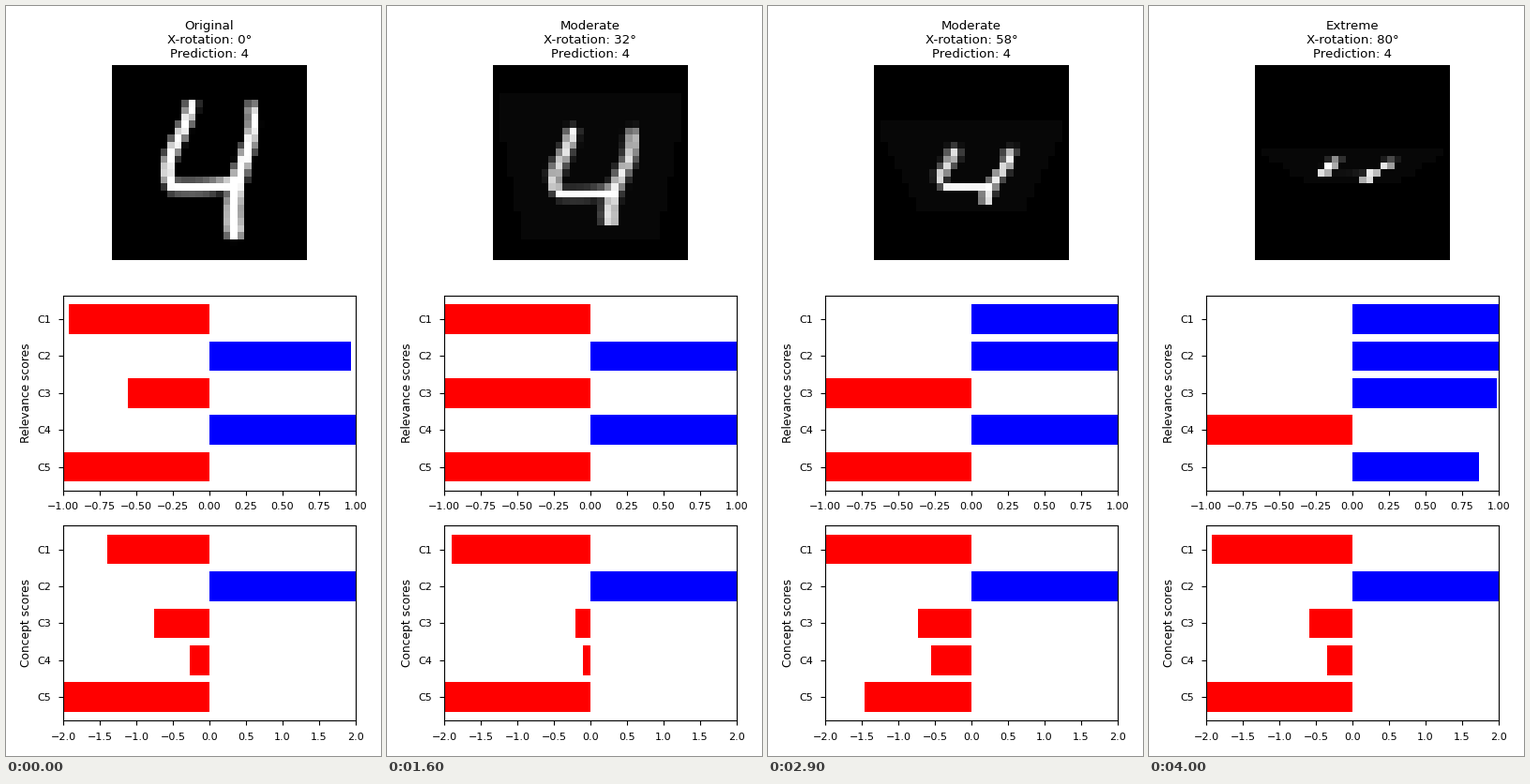
A matplotlib script for the animation above (4.1 s loop, 400 by 800 pixels).

```python
import numpy as np
import matplotlib.pyplot as plt
from matplotlib.animation import FuncAnimation

plt.rcParams.update({
    "font.family": "DejaVu Sans",
    "axes.labelsize": 8.8, "axes.titlesize": 9.6,
    "xtick.labelsize": 8, "ytick.labelsize": 8,
    "xtick.major.pad": 5.6, "ytick.major.pad": 5.6,
})

FRAMES, STEP_MS, STEP_DEG = 41, 100, 2
SIZE = 28
MID = (SIZE - 1) / 2
DEPTH = 27.5
BACKDROP = 7 / 255
ROWS, COLS = np.mgrid[0:SIZE, 0:SIZE].astype(float)


def bezier(p0, p1, p2, p3, n=16):
    t = np.linspace(0, 1, n)[:, None]
    p0, p1, p2, p3 = map(np.array, (p0, p1, p2, p3))
    s = 1 - t
    return s**3 * p0 + 3 * s * s * t * p1 + 3 * s * t * t * p2 + t**3 * p3


def pen(path, start_reach, end_reach):
    """Soft stroke along a path; ink fades out over the last unit of reach."""
    ink = np.zeros((SIZE, SIZE))
    reach = np.linspace(start_reach, end_reach, len(path))
    for (x0, y0), (x1, y1), r in zip(path, path[1:], reach):
        dx, dy = x1 - x0, y1 - y0
        t = ((COLS - x0) * dx + (ROWS - y0) * dy) / (dx * dx + dy * dy)
        t = np.clip(t, 0, 1)
        dist = np.hypot(COLS - x0 - t * dx, ROWS - y0 - t * dy)
        ink = np.maximum(ink, np.clip(r - dist, 0, 1))
    return ink


def draw_digit():
    hook = bezier((10.9, 5.3), (10.2, 9.5), (5.5, 14), (8.5, 17))
    bar = bezier((8.5, 17), (13, 17.1), (15, 16.9), (17.3, 16.3))
    stem = bezier((19.6, 5.6), (20.7, 11), (16.1, 15), (17.1, 23.3))
    return np.maximum.reduce([pen(hook, 1.3, 1.38), pen(bar, 1.33, 1.4),
                              pen(stem, 1.2, 1.75)])


def sample(img, x, y):
    """Bilinear lookup, zero outside the image."""
    padded = np.pad(img, 2)
    x = np.clip(x + 2, 0, SIZE + 2.99)
    y = np.clip(y + 2, 0, SIZE + 2.99)
    i, j = y.astype(int), x.astype(int)
    fy, fx = y - i, x - j
    top = padded[i, j] * (1 - fx) + padded[i, j + 1] * fx
    low = padded[i + 1, j] * (1 - fx) + padded[i + 1, j + 1] * fx
    return top * (1 - fy) + low * fy


def tilt(img, degrees):
    """Rotate the image plane about the x axis, lower edge moving away."""
    if degrees == 0:
        return img
    k = np.sin(np.radians(degrees)) ** 1.5 / DEPTH
    cos = np.cos(np.radians(0.96 * degrees))
    shift = cos * MID * (1 - 1 / (1 + 2 * MID * k)) / 2 + 0.5
    x, y = COLS - MID, ROWS - MID
    yo = y - shift
    v = yo * (1 + MID * k) / (cos - yo * k)
    u = x * (1 + (v + MID) * k) * 0.95
    ink = sample(img, u + MID, v + MID)
    plane = (abs(u) <= 13) & (abs(v) <= 14) & (abs(x) < 13) & (abs(y) < 13)
    return np.maximum(ink / ink.max(), BACKDROP * plane)


def level(degrees):
    if degrees == 0:
        return "Original"
    if degrees <= 30:
        return "Minor"
    return "Moderate" if degrees <= 60 else "Extreme"


def flip(frame, start, when):
    """Grow to saturation, then swing to the other sign around `when`."""
    size = min(abs(start) + 0.15 * frame, 1.2)
    return np.sign(start) * size * np.clip((when - frame) / 2, -1, 1)


def swell(frame, base, drop, peak, centre, width):
    """Level with a quick initial settling and one broad bump."""
    bump = np.exp(-((frame - centre) / width) ** 2)
    return base + drop * np.exp(-frame) + peak * bump


NEVER = 10 * FRAMES
RELEVANCE = [(-.962, 24), (.968, NEVER), (-.557, 38.35), (1.1, 38),
             (-1.1, 38.55)]
CONCEPT = [(1.11, 0, -3.15, 28.6, 60), (2.2, 0, 0, 0, 1),
           (-.13, -.626, -.68, 33, 11.3), (-.08, -.19, -.54, 32.5, 9),
           (-2.15, 0, .69, 28, 9.7)]


def make_bars(ax, label, limit):
    bars = ax.barh(range(5), [0] * 5)
    ax.set_yticks(range(5), [f"C{i + 1}" for i in range(5)])
    ax.set_ylim(4.64, -0.64)
    ax.set_xlim(-limit, limit)
    ax.set_xticks(np.linspace(-limit, limit, 9))
    ax.set_ylabel(label)
    return bars


def set_bars(bars, rule, params, frame):
    for bar, args in zip(bars, params):
        value = rule(frame, *args)
        bar.set_width(value)
        bar.set_facecolor("blue" if value > 0 else "red")


digit = draw_digit()
fig, (top_ax, mid_ax, low_ax) = plt.subplots(3, 1, figsize=(4, 8), dpi=100)
picture = top_ax.imshow(digit, cmap="gray", vmin=0, vmax=1,
                        interpolation="nearest")
top_ax.axis("off")
relevance_bars = make_bars(mid_ax, "Relevance scores", 1)
concept_bars = make_bars(low_ax, "Concept scores", 2)


def update(frame):
    degrees = frame * STEP_DEG
    picture.set_data(tilt(digit, degrees))
    top_ax.set_title(f"{level(degrees)}\nX-rotation: {degrees}°\n"
                     "Prediction: 4")
    set_bars(relevance_bars, flip, RELEVANCE, frame)
    set_bars(concept_bars, swell, CONCEPT, frame)


update(0)
fig.tight_layout()
anim = FuncAnimation(fig, update, frames=FRAMES, interval=STEP_MS,
                     repeat=True, repeat_delay=0)
plt.show()
```
